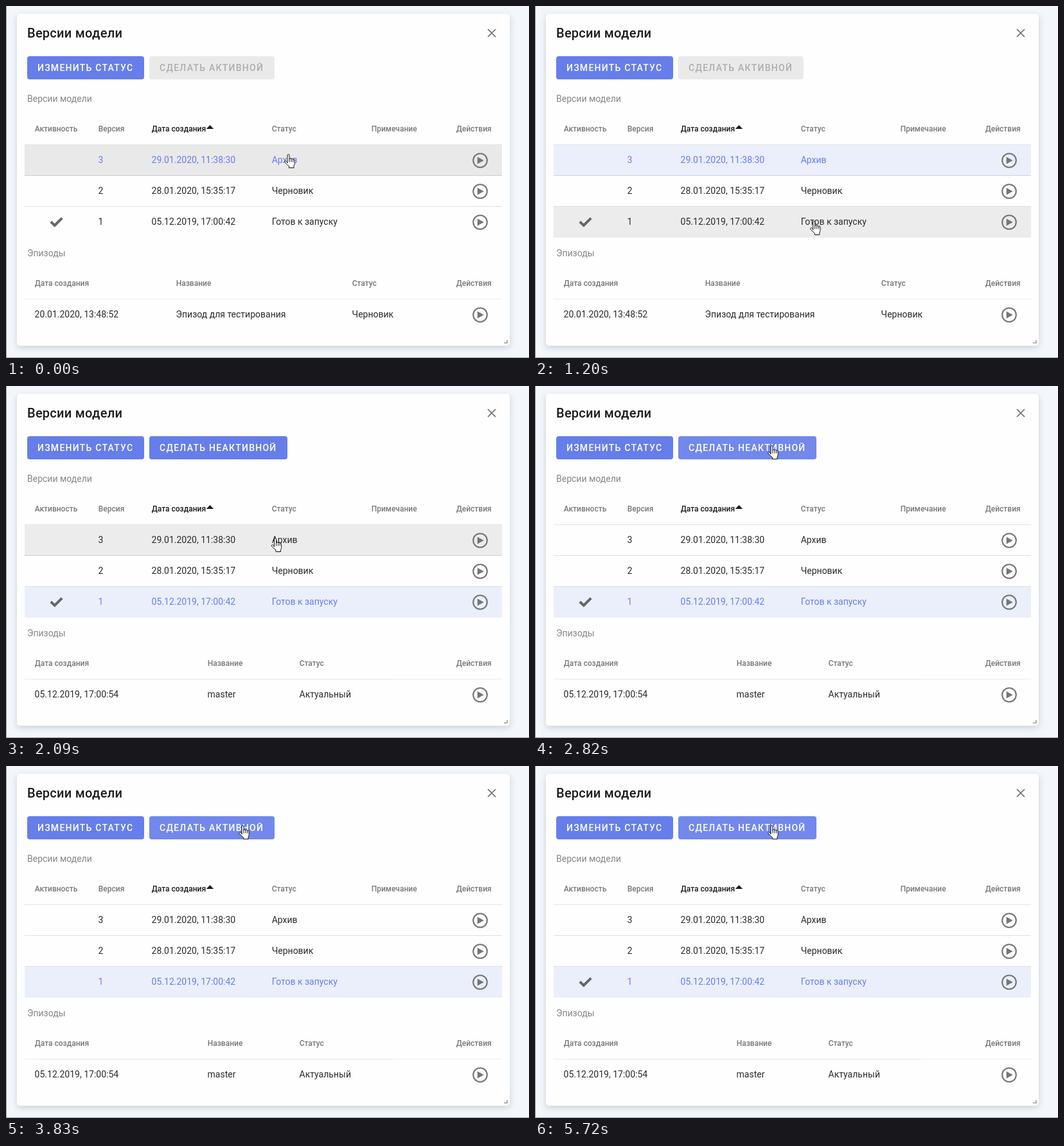
Animation of 814 by 547 pixels, one loop 6620 ms. Source, as an HTML page:

```html
<!DOCTYPE html>
<html lang="ru">
<head>
<meta charset="utf-8">
<title>Версии модели</title>
<style>
  html, body { margin: 0; width: 100%; height: 100%; overflow: hidden; background: #f3f6fa; }
  svg { display: block; position: absolute; left: 0; top: 0; }
  text { font: 400 14px Roboto, sans-serif; fill: #2b2b2b; white-space: pre; }
  .title { font-size: 20px; font-weight: 500; letter-spacing: .25px; fill: #1c1c1c; }
  .label { fill: #868686; }
  .head { font-size: 12px; font-weight: 500; fill: #787878; }
  .sorted { fill: #1c1c1c; }
  .button { font-weight: 500; letter-spacing: 1.25px; fill: #fff; }
  .off rect { fill: #eaeaea; }
  .off text { fill: #adadad; }
  .selected text { fill: #667eea; }
  .card { filter: drop-shadow(0 3px 5px rgba(70, 90, 120, .24)); }
</style>
</head>
<body>
<svg id="stage" width="814" height="547" viewBox="0 0 814 547">
  <defs>
    <clipPath id="clip"><rect id="clipBox" x="223" y="78" width="195" height="36" rx="4"/></clipPath>
    <g id="play">
      <circle r="10.8" fill="none" stroke="#757575" stroke-width="2.1"/>
      <path d="M-4.3-5.6L5.7 0L-4.3 5.6z" fill="#757575"/>
    </g>
  </defs>
  <rect width="814" height="547" fill="#f3f6fa"/>
  <path d="M.5 0V547M0 546.5H814" stroke="#969799"/>
  <rect class="card" x="17" y="12" width="767" height="516" rx="5" fill="#fefefe"/>
  <path d="M750 36l12 12m0-12l-12 12" stroke="#6c6c6c" stroke-width="1.7"/>
  <path d="M780 519v4.5h-5" fill="none" stroke="#989898" stroke-width="1.5"/>
  <text class="title" x="33" y="49">Версии модели</text>
  <rect x="33" y="78" width="182" height="36" rx="4" fill="#667eea"/>
  <text class="button" x="49" y="101">ИЗМЕНИТЬ СТАТУС</text>
  <g id="toggle">
    <rect id="toggleBox" x="223" y="78" width="195" height="36" rx="4" fill="#667eea"/>
    <g clip-path="url(#clip)" fill="#fff">
      <path id="hover" d="M223 78h215v36h-215z"/>
      <circle id="ripple" cx="368" cy="96"/>
    </g>
    <text id="toggleText" class="button" x="239" y="101"></text>
  </g>
  <text class="label" x="33" y="149">Версии модели</text>
  <text class="label" x="33" y="389">Эпизоды</text>
  <path d="M29 215.5H772" stroke="#e3e3e3"/>
  <path d="M311.8 191l5.7-6 5.7 6z" fill="#1c1c1c"/>
  <g id="table"></g>
  <path d="M29 455.5H772" stroke="#ebebeb"/>
  <path id="episodeLine" d="M45 455.5H604" stroke="#e5e5e5"/>
  <g id="episodes"></g>
  <path id="check" d="M69.8 335.2l6 5.8L87.2 329.6" fill="none" stroke="#666" stroke-width="4"/>
  <path id="cursor" fill="#fff" stroke="#111" stroke-linejoin="round"/>
</svg>
<script>
const LOOP = 6620;
const HAND = 'M5.5 14V2q0-1.5 1.5-1.5t1.5 1.5v6q0-1.2 1.5-1.2t1.5 1.5q0-1 1.4-1t1.4 1.5q.2-.8 1.2-.8t1.2 1.5v5q0 2-1.2 3.7v3.3h-7.5v-2.5q-3-2.5-6.5-6q-.7-1.6 .6-2.1t2.4 1z' +
  'M8.5 8v4.5M11.5 8.5v4M14.3 9v3.5';
const ARROW = 'M.5.5v16.2l3.7-3.5 2.3 5.2 2.3-1-2.3-5h5z';

const $ = id => document.getElementById(id);
const set = (el, attrs) => {
  for (const k in attrs) el.setAttribute(k, attrs[k]);
  return el;
};
const add = (parent, tag, attrs) =>
  parent.appendChild(set(document.createElementNS('http://www.w3.org/2000/svg', tag), attrs));
const write = (parent, x, y, str, cls = '') =>
  add(parent, 'text', { x, y, class: cls }).textContent = str;
const play = (parent, y) => add(parent, 'use', { href: '#play', x: 738, y });

const heads = [[45, 'Активность'], [144, 'Версия'], [227, 'Дата создания'],
  [414, 'Статус'], [569, 'Примечание'], [701, 'Действия']];
heads.forEach(([x, s], i) => write($('table'), x - .3, 195, s, i === 2 ? 'head sorted' : 'head'));

const rows = [
  ['3', '29.01.2020, 11:38:30', 'Архив'],
  ['2', '28.01.2020, 15:35:17', 'Черновик'],
  ['1', '05.12.2019, 17:00:42', 'Готов к запуску']
].map((cells, i) => {
  const y = 216 + 48 * i;
  const g = add($('table'), 'g', {});
  const bg = add(g, 'rect', { x: 29, y, width: 743, height: 48 });
  if (i < 2) add(g, 'path', { d: `M29 ${y + 47.5}H772`, stroke: '#000', 'stroke-opacity': .12 });
  cells.forEach((s, c) => write(g, [143.6, 226.6, 413.7][c], y + 28, s));
  play(g, y + 24);
  return { g, bg };
});

const episodes = [
  [265, 539, '20.01.2020, 13:48:52', 'Эпизод для тестирования', 'Черновик'],
  [314, 457, '05.12.2019, 17:00:54', 'master', 'Актуальный']
].map(([nameX, statusX, date, name, status]) => {
  const g = add($('episodes'), 'g', {});
  const cols = [[45, 'Дата создания', date], [nameX, 'Название', name], [statusX, 'Статус', status]];
  for (const [x, head, cell] of cols) {
    write(g, x - .3, 435, head, 'head');
    write(g, x - .4, 484, cell);
  }
  write(g, 700.7, 435, 'Действия', 'head');
  play(g, 480);
  return g;
});

// Each step lists only what changes; the rest carries over.
const steps = [
  [0, { at: [432.5, 230], arrow: false, sel: 0, hov: 0, ep: 0, off: true, active: false, check: true, glow: 0, ripple: [0, 0] }],
  [440, { at: [430, 238] }],
  [590, { at: [426, 266] }],
  [740, { at: [421.5, 292], hov: 1 }],
  [900, { at: [426, 326], hov: 2 }],
  [1050, { at: [427, 332.5] }],
  [1200, { at: [427.3, 334] }],
  [1500, { sel: 2, off: false, active: true }],
  [1650, { ep: 1 }],
  [2090, { at: [412, 236], hov: 0 }],
  [2240, { at: [409, 190], hov: -1, arrow: true }],
  [2370, { at: [400, 146.5] }],
  [2520, { at: [382, 115.5] }],
  [2670, { at: [364, 94], arrow: false, glow: .04 }],
  [2820, { at: [361.5, 92], glow: .08 }],
  [3100, { ripple: [220, .06] }],
  [3250, { ripple: [220, .22] }],
  [3400, { ripple: [220, .12] }],
  [3530, { active: false, ripple: [0, 0] }],
  [3830, { check: false }],
  [5010, { ripple: [70, .18] }],
  [5140, { ripple: [132, .22] }],
  [5290, { ripple: [220, .18] }],
  [5440, { active: true, ripple: [0, 0] }],
  [5720, { check: true }]
];
let carried = {};
const states = steps.map(([time, change]) => ({ time, ...(carried = { ...carried, ...change }) }));

function draw(s) {
  rows.forEach(({ g, bg }, i) => {
    const on = s.sel === i;
    g.setAttribute('class', on ? 'selected' : '');
    bg.setAttribute('fill', s.hov === i ? (on ? '#e9e9e9' : '#ececec') : on ? '#ebeffc' : 'none');
  });
  episodes.forEach((g, i) => set(g, { display: s.ep === i ? 'inline' : 'none' }));
  set($('episodeLine'), { display: s.ep ? 'inline' : 'none' });
  set($('check'), { display: s.check ? 'inline' : 'none' });

  const width = s.active ? 215 : 195;
  set($('toggle'), { class: s.off ? 'off' : '' });
  set($('toggleBox'), { width });
  set($('clipBox'), { width });
  set($('hover'), { opacity: s.glow });
  set($('ripple'), { r: s.ripple[0], opacity: s.ripple[1] });
  $('toggleText').textContent = s.active ? 'СДЕЛАТЬ НЕАКТИВНОЙ' : 'СДЕЛАТЬ АКТИВНОЙ';

  set($('cursor'), { d: s.arrow ? ARROW : HAND, transform: `translate(${s.at})` });
}

const start = performance.now();
let shown;
function tick() {
  const t = (performance.now() - start) % LOOP;
  const state = states.findLast(s => s.time <= t);
  if (state !== shown) draw(shown = state);
  requestAnimationFrame(tick);
}
tick();
</script>
</body>
</html>
```
